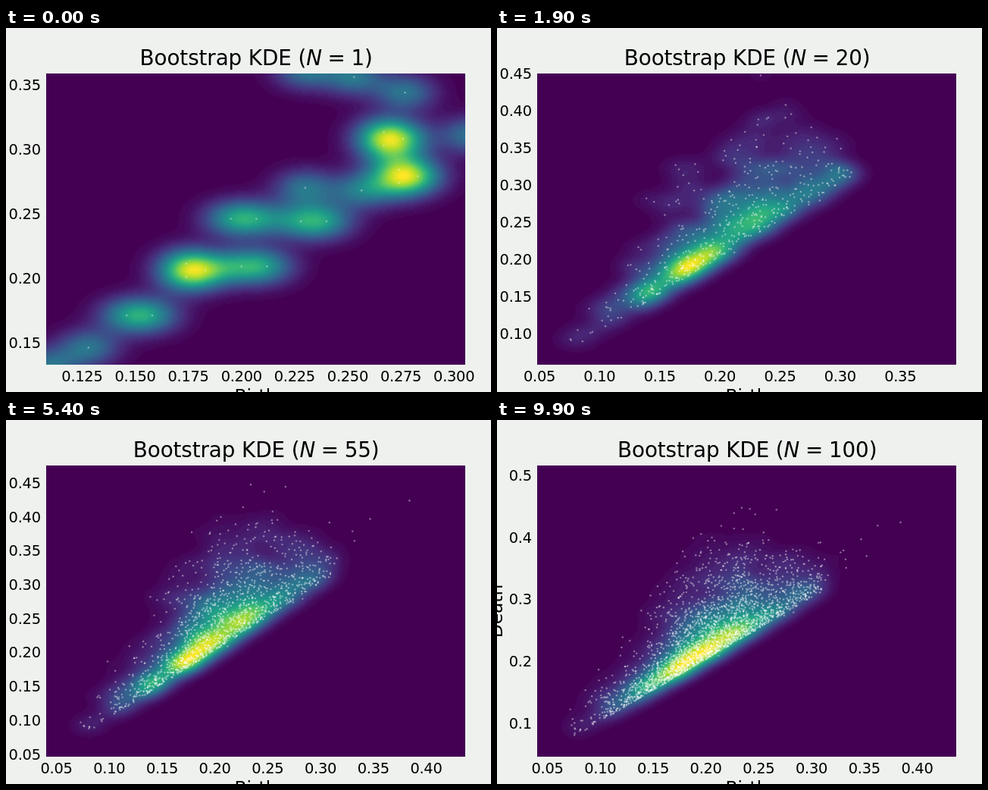
These frames come from a looping animation (640 by 480 pixels, 10000 ms). An HTML page with a canvas:

```html
<!DOCTYPE html>
<html lang="en">
<head>
<meta charset="utf-8">
<title>Bootstrap KDE</title>
<style>
html, body { margin: 0; width: 100%; height: 100%; overflow: hidden; background: #eef1ee; }
canvas { display: block; }
</style>
</head>
<body>
<canvas id="stage" width="640" height="480"></canvas>
<script>
const ctx = document.getElementById('stage').getContext('2d');
const STEPS = 100, STEP_MS = 100, PER_STEP = 24;
const BOX = { x: 53, y: 60, w: 553, h: 384 };
const CELL = 2, GW = 277, GH = 192;
const BANDWIDTH = 0.01, LEVELS = 50;
const FONT = '"DejaVu Sans", sans-serif';

// The axes widen in jumps: first step, x min, x max, y min, y max
const LIMITS = [
  [0, .1081, .3053, .1327, .3588],
  [3, .0761, .3507, .0955, .4235],
  [9, .0481, .3965, .0577, .4503],
  [38, .0406, .4252, .0478, .4503],
  [50, .0403, .4370, .0461, .4758],
  [80, .0403, .4370, .0461, .5159]
];

// Clumps of the first sample: x, y, count
const CLUMPS = [
  [.109, .131, 1], [.128, .146, 1], [.152, .171, 2], [.177, .206, 3], [.206, .209, 2],
  [.201, .246, 2], [.234, .244, 2], [.230, .270, 1], [.2565, .268, 1], [.277, .279, 3],
  [.270, .308, 3], [.277, .344, 1], [.253, .356, 1], [.230, .361, 1], [.308, .311, 1]
];

let seed = 20;
function rnd() {
  seed = (seed + 0x6D2B79F5) | 0;
  let t = Math.imul(seed ^ seed >>> 15, 1 | seed);
  t = t + Math.imul(t ^ t >>> 7, 61 | t) ^ t;
  return ((t ^ t >>> 14) >>> 0) / 4294967296;
}
const gauss = () => Math.sqrt(-2 * Math.log(1 - rnd())) * Math.cos(2 * Math.PI * rnd());
const expo = mean => -mean * Math.log(1 - rnd());

// A birth/death pair: dense near the diagonal, sparse far above it.
function samplePair() {
  for (;;) {
    const r = rnd();
    let x, life;
    if (r < .46) { x = .178 + .042 * gauss(); life = .003 + expo(.02); }
    else if (r < .58) { x = .225 + .085 * rnd(); life = .003 + expo(.02); }
    else if (r < .88) { x = .212 + .036 * gauss(); life = .01 + .065 * Math.abs(gauss()); }
    else if (r < .975) { x = .208 + .033 * gauss(); life = .05 + .17 * rnd(); }
    else { x = .28 + .15 * rnd() * rnd(); life = .01 + .06 * rnd(); }
    const y = x + life;
    const inside = x > .045 && y < .17 + 2.4 * (x - .09) && y < .45;
    if (inside && (y < .38 || rnd() < .3)) return [x, y];
  }
}

const points = [];
const add = (x, y, step) => points.push({ x, y, step });
for (const [x, y, count] of CLUMPS) {
  const radius = count > 1 ? .006 : 0;
  for (let k = 0; k < count; k++) {
    const angle = 2 * Math.PI * k / count;
    add(x + radius * Math.cos(angle), y + radius * Math.sin(angle), 0);
  }
}
for (let step = 1; step < STEPS; step++) {
  for (let n = 0; n < PER_STEP; n++) add(...samplePair(), step);
}

const VIRIDIS = [0x440154, 0x482878, 0x3e4a89, 0x31688e, 0x26828e, 0x1f9e89, 0x35b779, 0x6ece58, 0xb5de2b, 0xfde725];
const palette = Array.from({ length: LEVELS }, (_, i) => {
  const pos = i / (LEVELS - 1) * (VIRIDIS.length - 1);
  const a = Math.min(Math.floor(pos), VIRIDIS.length - 2), f = pos - a;
  return [16, 8, 0].map(s => (VIRIDIS[a] >> s & 255) * (1 - f) + (VIRIDIS[a + 1] >> s & 255) * f);
});

const heat = document.createElement('canvas');
heat.width = GW;
heat.height = GH;
const heatCtx = heat.getContext('2d');
const image = heatCtx.createImageData(GW, GH);
const density = new Float32Array(GW * GH);

// Kernel weights of the cells around a centre, along one axis
function weights(centre, sigma, size) {
  const from = Math.max(0, Math.ceil(centre - 3.6 * sigma));
  const to = Math.min(size - 1, Math.floor(centre + 3.6 * sigma));
  const w = [];
  for (let i = from; i <= to; i++) w.push(Math.exp(-(((i - centre) / sigma) ** 2) / 2));
  return { from, w };
}

function drawDensity(shown, px, py, sx, sy) {
  density.fill(0);
  for (const p of shown) {
    const h = weights((px(p.x) - BOX.x) / CELL - .5, BANDWIDTH * sx / CELL, GW);
    const v = weights((py(p.y) - BOX.y) / CELL - .5, BANDWIDTH * sy / CELL, GH);
    for (let j = 0; j < v.w.length; j++) {
      const row = (v.from + j) * GW + h.from;
      for (let i = 0; i < h.w.length; i++) density[row + i] += v.w[j] * h.w[i];
    }
  }
  const max = density.reduce((a, b) => Math.max(a, b), 0);
  density.forEach((d, i) => {
    const c = palette[Math.min(LEVELS - 1, Math.floor(d / max * LEVELS))];
    image.data.set([c[0], c[1], c[2], 255], i * 4);
  });
  heatCtx.putImageData(image, 0, 0);
  ctx.drawImage(heat, BOX.x, BOX.y, GW * CELL, GH * CELL);
}

function drawTitle(n) {
  const size = 27.78, gap = size * 5 / 18;
  const parts = [['Bootstrap KDE (', '', 0], ['N', 'italic ', gap], ['=', '', gap], [n + ')', '', 0]];
  const setFont = style => ctx.font = style + size + 'px ' + FONT;
  ctx.letterSpacing = '-0.09px';
  let width = 0;
  for (const [text, style, space] of parts) {
    setFont(style);
    width += ctx.measureText(text).width + space;
  }
  let x = 330.2 - width / 2;
  ctx.textAlign = 'left';
  for (const [text, style, space] of parts) {
    setFont(style);
    ctx.fillText(text, x, 49);
    x += ctx.measureText(text).width + space;
  }
}

function ticks(min, max, step, draw) {
  for (let k = Math.ceil(min / step); k * step <= max; k++) draw(k * step);
}

function drawAxes(x0, x1, y0, y1, px, py) {
  const fine = x1 - x0 < .22, coarse = y1 - y0 > .45;
  ctx.font = '19.44px ' + FONT;
  ctx.letterSpacing = '-0.3px';
  ctx.textAlign = 'center';
  ticks(x0, x1, fine ? .025 : .05, v => ctx.fillText(v.toFixed(fine ? 3 : 2), px(v), 466));
  ctx.textAlign = 'right';
  ticks(y0, y1, coarse ? .1 : .05, v => ctx.fillText(v.toFixed(coarse ? 1 : 2), 45.7, py(v) + 7));

  ctx.font = '23.33px ' + FONT;
  ctx.letterSpacing = '0px';
  ctx.textAlign = 'center';
  ctx.fillText('Birth', 329.5, 493);
  ctx.save();
  ctx.translate(coarse ? 7 : -6, 252);
  ctx.rotate(-Math.PI / 2);
  ctx.fillText('Death', 0, 0);
  ctx.restore();
}

function draw(step) {
  const [, x0, x1, y0, y1] = LIMITS.filter(l => l[0] <= step).pop();
  const sx = BOX.w / (x1 - x0), sy = BOX.h / (y1 - y0);
  const px = x => BOX.x + (x - x0) * sx;
  const py = y => BOX.y + (y1 - y) * sy;
  const shown = points.filter(p => p.step <= step);

  ctx.fillStyle = '#eef1ee';
  ctx.fillRect(0, 0, 640, 480);
  ctx.save();
  ctx.beginPath();
  ctx.rect(BOX.x, BOX.y, BOX.w, BOX.h);
  ctx.clip();
  drawDensity(shown, px, py, sx, sy);
  ctx.fillStyle = 'rgba(255,255,255,.42)';
  for (const p of shown) {
    ctx.beginPath();
    ctx.arc(px(p.x), py(p.y), 1.2, 0, 2 * Math.PI);
    ctx.fill();
  }
  ctx.restore();

  ctx.fillStyle = '#000';
  drawTitle(step + 1);
  drawAxes(x0, x1, y0, y1, px, py);
}

let current = -1;
function tick() {
  const step = Math.floor(performance.now() / STEP_MS) % STEPS;
  if (step !== current) draw(current = step);
  requestAnimationFrame(tick);
}
tick();
</script>
</body>
</html>
```
